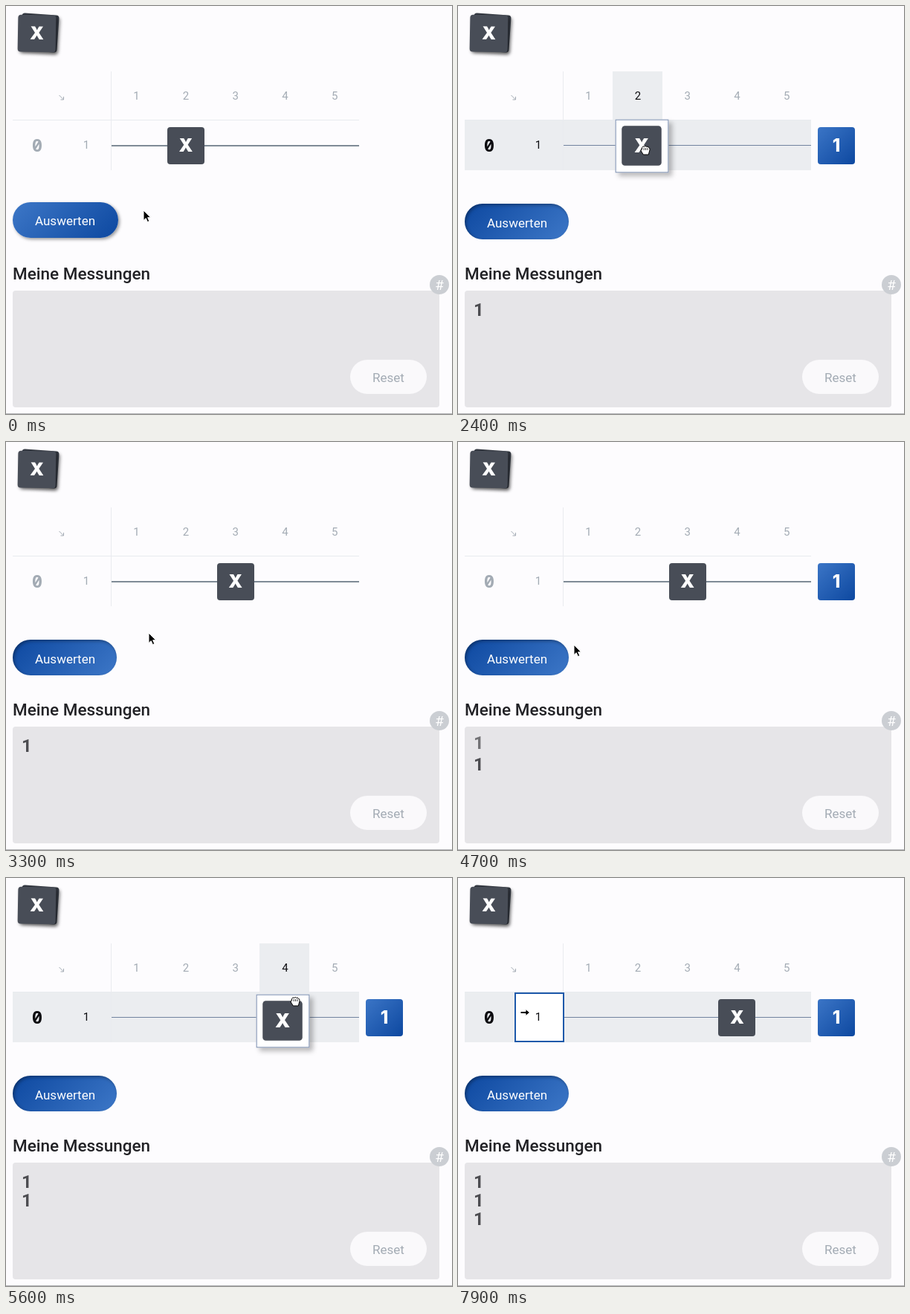
These frames come from a looping animation (600x549 px, 8 s). An HTML page:

```html
<!DOCTYPE html>
<html lang="de">
<head>
<meta charset="utf-8">
<title>Messungen</title>
<style>
  html, body { margin: 0; width: 100%; height: 100%; overflow: hidden; background: #fdfcfe; }
  #stage { position: relative; width: 600px; height: 549px; overflow: hidden; font: 15px Roboto, sans-serif; color: #a3abb4; }
  #stage div, #stage svg { position: absolute; box-sizing: border-box; white-space: nowrap; }
  .label { width: 40px; height: 20px; line-height: 20px; text-align: center; }
  .lit { color: #0c0c10; }
  .mono { font: 700 24px/30px "Noto Sans Mono", monospace; }
  .band { background: #ebedf0; }
  .rule { background: #e9ebef; }
  .card { width: 50px; height: 50px; border-radius: 4px; background: #484d57; color: #fff;
          font: 900 24px/50px Inter, sans-serif; text-align: center; }
  .cell { width: 67px; height: 67px; background: #fff; border: 2px solid #1d59aa; }
  .cell.lifted { border: 1px solid #8294b5; box-shadow: 4px 4px 6px #0004; }
  #result { left: 484px; top: 163px; background: linear-gradient(135deg, #3b75c6, #0d48a0); }
  #button { left: 9px; top: 264px; width: 142px; height: 48px; border-radius: 24px; color: #fff;
            font-size: 17px; line-height: 50px; padding-left: 30px;
            background: linear-gradient(135deg, #3d77c7, #0d48a0); box-shadow: 2px 2px 4px #0006; }
  #button.pressed { top: 266px; width: 140px; height: 48px; line-height: 52px;
            background: linear-gradient(135deg, #0d48a0, #3d77c7); box-shadow: inset 2px 2px 4px #0005; }
  .entry { left: 21px; height: 24px; font: 700 24px/24px Roboto, sans-serif; color: #4d4d51; }
</style>
</head>
<body>
<div id="stage">
  <div class="card" style="left:20px;top:11px;transform:rotate(4deg);background:#343942;box-shadow:2px 3px 4px #0006"></div>
  <div class="card" style="left:16px;top:12px;width:51px;transform:rotate(1deg);box-shadow:2px 2px 4px #0006">X</div>

  <div id="row" class="band" style="left:9px;top:154px;width:466px;height:67px"></div>
  <div id="column" class="band" style="top:88px;width:67px;height:66px"></div>
  <div class="rule" style="left:141px;top:88px;width:1px;height:133px"></div>
  <div class="rule" style="left:9px;top:153px;width:466px;height:1px"></div>
  <div id="track" style="left:142px;top:187px;width:333px"></div>
  <svg style="left:70px;top:118px" width="10" height="10" fill="none" stroke="#a3abb4"><path d="M1.5 2L7.5 8M3.5 8H7.5V4"/></svg>
  <div id="cell" class="cell"></div>
  <div id="zero" class="label mono" style="left:22px;top:172px;height:30px">0</div>
  <div id="one" class="label" style="left:88px;top:177px">1</div>
  <div id="card" class="card">X</div>
  <div id="result" class="card mono" style="line-height:50px;font-weight:800">1</div>

  <div id="button">Auswerten</div>
  <div style="left:9px;top:345px;font:500 22.5px/30px Roboto,sans-serif;color:#222226">Meine Messungen</div>
  <div style="left:9px;top:383px;width:574px;height:157px;border-radius:4px;background:#e6e5e8"></div>
  <div style="left:570px;top:362px;width:26px;height:26px;border-radius:13px;background:#cbced3;color:#fff;font-size:19px;line-height:27px;text-align:center">#</div>
  <div style="left:463px;top:476px;width:103px;height:46px;border-radius:23px;background:#faf9fb;font-size:17px;line-height:48px;text-align:center">Reset</div>
  <div style="left:0;top:548px;width:600px;height:1px;background:#b4b4b7"></div>

  <svg id="cursor" style="left:0;top:0;z-index:2" width="600" height="549" stroke-linejoin="round">
    <g id="arrow"><path d="M0 0V13.5L3.2 10.6L5.4 15.6L7.8 14.5L5.6 9.7H9.7Z" fill="#000" stroke="#fff"/></g>
    <g id="pointer"><path d="M-1.5 1Q0 -.8 1.5 1L2.2 6Q4 4.6 4.6 6.4Q6.2 5.4 6.7 7.1Q8.6 6.6 8.4 9L7.4 15.5H0L-4.2 9.5Q-4.5 7.3 -2.4 8L-.6 9.5Z" fill="#fff" stroke="#000"/><path d="M1.7 11V14M3.6 11V14M5.5 11V14" stroke="#000" stroke-width=".8"/></g>
    <g id="fist"><path d="M-4.5 -3.5Q-3 -6.4 -1.5 -4.6Q.3 -6.6 1.6 -4.6Q3.4 -5.8 4.2 -3.8Q6.3 -4 6 -.5L4.3 6H-2.7L-5.8 1Q-6.6 -1.3 -4.5 -1Z" fill="#fff" stroke="#000"/><path d="M-1.8 -3V0M.6 -3V0M3 -3V0" stroke="#000" stroke-width=".8"/></g>
    <g id="east"><path d="M-6 -1.5H1V-4.5L6.5 0L1 4.5V1.5H-6Z" fill="#000" stroke="#fff"/></g>
  </svg>
</div>
<script>
  const LOOP = 8000, STEP = 100;
  const LEFT = 142, PITCH = 66.7, ROW_Y = 187.5;
  const $ = id => document.getElementById(id);
  const stage = $('stage');

  // time, x, y of the mouse
  const path = [
    [0, 185, 275], [100, 183, 276], [900, 115, 290], [1700, 115, 290], [1900, 155, 258],
    [2200, 247, 194], [2300, 247, 194], [2400, 252, 194], [2700, 305, 190], [2900, 313, 193],
    [3100, 313, 193], [3200, 240, 228], [3300, 192, 257], [3800, 115, 288], [4400, 115, 288],
    [4700, 156, 273], [4900, 280, 178], [5000, 325, 161.5], [5200, 325, 161.5], [5600, 389, 166],
    [5700, 392, 163], [5900, 392, 163], [6000, 350, 235], [6700, 115, 285], [7600, 110, 283],
    [7700, 105, 282], [7800, 97, 228], [7900, 90, 181], [8000, 90, 181]
  ];
  const drags = [{ from: 2300, to: 3000, dx: 5, dy: 6 }, { from: 5200, to: 5800, dx: 17, dy: -26 }];
  const readings = [1400, 4400, 7100];

  function add(className, text, css) {
    const el = document.createElement('div');
    el.className = className;
    el.textContent = text;
    Object.assign(el.style, css);
    return stage.appendChild(el);
  }
  const columnX = i => LEFT + PITCH * (i + 0.5);
  const headers = [0, 1, 2, 3, 4].map(i =>
    add('label', i + 1, { left: columnX(i) - 20 + 'px', top: '111px' }));
  const entries = readings.map(() => add('entry', '1', {}));

  const show = (el, on) => { el.style.display = on ? '' : 'none'; };
  const centre = (el, x, y, size, scale) => {
    el.style.left = x - size / 2 + 'px';
    el.style.top = y - size / 2 + 'px';
    el.style.transform = `scale(${scale})`;
  };

  function mouseAt(t) {
    const i = path.findIndex(p => p[0] > t);
    const [t0, x0, y0] = path[i - 1], [t1, x1, y1] = path[i];
    const k = (t - t0) / (t1 - t0);
    return [x0 + (x1 - x0) * k, y0 + (y1 - y0) * k];
  }

  function draw(t) {
    const [x, y] = mouseAt(t);
    const drag = drags.find(d => t >= d.from && t < d.to);
    const drops = drags.filter(d => t >= d.to).length;
    const cardX = drag ? x - drag.dx : columnX(1 + drops);
    const cardY = drag ? y - drag.dy : ROW_Y + 0.5;

    const inRow = x > 9 && x < 475 && y > 154 && y < 221;
    const column = inRow ? Math.floor((x - LEFT) / PITCH) : -1;
    const onCard = drag || (Math.abs(x - cardX) < 26 && Math.abs(y - cardY) < 27);
    const onNumber = inRow && x > 76 && x < LEFT;
    const onButton = x < 149 && y > 266 && y < 314;

    show($('row'), inRow);
    show($('column'), column >= 0);
    $('column').style.left = Math.round(LEFT + PITCH * column) - 1 + 'px';
    headers.forEach((h, i) => h.classList.toggle('lit', i === column));
    $('zero').classList.toggle('lit', inRow);
    $('one').classList.toggle('lit', inRow);
    $('track').style.height = inRow ? '1px' : '1.5px';
    $('track').style.background = inRow ? '#71839f' : '#7f8b96';

    const scale = drag ? 1.07 : 1;
    centre($('card'), cardX, cardY, 50, scale);
    show($('cell'), onCard || onNumber);
    $('cell').classList.toggle('lifted', !!drag);
    centre($('cell'), onNumber ? 109 : cardX, onNumber ? ROW_Y : cardY, 67, scale);

    const lastReading = Math.max(0, ...readings.filter(r => t >= r));
    const lastDrop = Math.max(0, ...drags.map(d => d.to).filter(d => t >= d));
    show($('result'), lastReading > lastDrop);
    $('button').classList.toggle('pressed', t >= 900);

    // The newest reading slides in on top and pushes the others down.
    const count = readings.filter(r => t >= r).length;
    entries.forEach((el, i) => {
      const rest = Math.max(0, 1 - (t - readings[i]) / 600) ** 2;
      show(el, i < count);
      el.style.top = 397 + 25 * (count - 1 - i) - 16 * rest + 'px';
      el.style.opacity = 1 - rest;
    });

    const kind = onCard ? 'fist' : onNumber ? 'east' : onButton ? 'pointer' : 'arrow';
    for (const id of ['arrow', 'pointer', 'fist', 'east']) show($(id), id === kind);
    $(kind).setAttribute('transform', `translate(${x} ${y})`);
  }

  const start = performance.now();
  function tick() {
    const t = (performance.now() - start) % LOOP;
    draw(Math.floor(t / STEP) * STEP);
    requestAnimationFrame(tick);
  }
  tick();
</script>
</body>
</html>
```
